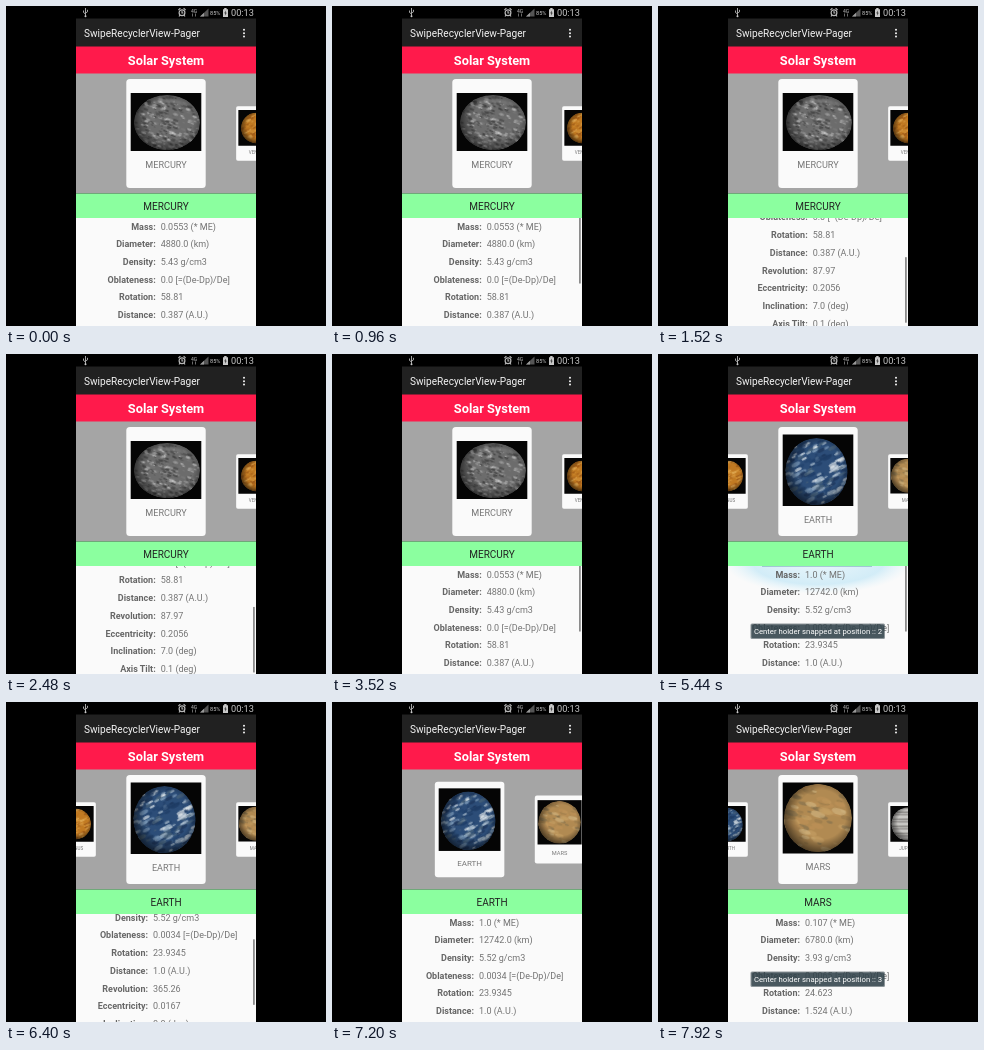
Write an HTML page that moves like this. It is 320 px wide and 320 px high and loops after 8 s.

```html
<!DOCTYPE html>
<html lang="en">
<head>
<meta charset="utf-8">
<title>Solar System pager</title>
<style>
html, body { margin: 0; width: 100%; height: 100%; overflow: hidden; background: #000; }
svg { display: block; width: 100vw; height: 100vh; font-family: Roboto, "Open Sans", sans-serif; }
</style>
</head>
<body>
<svg id="stage" viewBox="0 0 320 320">
  <defs>
    <clipPath id="pagerClip"><rect x="70" y="67" width="180" height="120"/></clipPath>
    <clipPath id="listClip"><rect x="70" y="212" width="180" height="108"/></clipPath>
    <radialGradient id="glowFill">
      <stop offset="0" stop-color="#d5f0fb" stop-opacity=".5"/>
      <stop offset=".7" stop-color="#bde5f6" stop-opacity=".65"/>
      <stop offset="1" stop-color="#d8f2fc" stop-opacity="0"/>
    </radialGradient>
    <radialGradient id="shade" cx=".55" cy=".45" r=".6">
      <stop offset=".6" stop-color="#000" stop-opacity="0"/>
      <stop offset="1" stop-color="#000" stop-opacity=".65"/>
    </radialGradient>
    <filter id="soft" x="-20%" y="-20%" width="140%" height="140%"><feGaussianBlur stdDeviation=".45"/></filter>
  </defs>

  <rect width="320" height="320" fill="#000"/>
  <rect x="70" y="12.5" width="180" height="28.5" fill="#212121"/>
  <rect x="70" y="40.5" width="180" height="27.5" fill="#ff1a4b"/>
  <rect x="70" y="67.5" width="180" height="120" fill="#a5a5a5"/>
  <rect x="70" y="212" width="180" height="108" fill="#fafafa"/>

  <g fill="none" stroke="#b8b8b8" stroke-width=".9">
    <path d="M79.5 2v8.5M79.5 8l-2-1.5v-2M79.5 7l2-1.2v-2"/>
    <circle cx="176" cy="6.7" r="2.9" stroke-width="1.2"/>
    <path d="M176 5v2h1.4M172.4 4l2-1.8M179.6 4l-2-1.8M174 9l-1 1.5M178 9l1 1.5" stroke-width="1.1"/>
    <path d="M186.5 7.5v3M189.5 7.5v3" stroke="#777"/>
  </g>
  <g fill="#c8c8c8">
    <path d="M194 10.5h8.5V2.5z" fill="#555"/>
    <path d="M194 10.5h4V6.7z" fill="#999"/>
    <path d="M217 3.2h1.2v-1.2h2.4v1.2h1.4v7.8h-5z"/>
    <path d="M219.8 4.5l-1.5 2.8h1.1l-.5 2.4 1.8-3h-1.1z" fill="#222"/>
    <circle cx="79.5" cy="10.2" r="1"/>
    <text x="185" y="6.5" font-size="5">4G</text>
    <text x="204" y="8.9" font-size="5.6">85%</text>
    <text x="225" y="9.8" font-size="9.2">00:13</text>
  </g>
  <text x="78" y="30.7" font-size="10.1" fill="#f4f4f4">SwipeRecyclerView-Pager</text>
  <g fill="#f4f4f4">
    <circle cx="238" cy="23.8" r="1"/><circle cx="238" cy="27.2" r="1"/><circle cx="238" cy="30.6" r="1"/>
  </g>
  <text x="160" y="59" font-size="12.8" font-weight="700" fill="#fff" text-anchor="middle">Solar System</text>

  <g clip-path="url(#pagerClip)"><g id="cards"></g></g>

  <g clip-path="url(#listClip)">
    <g id="glow">
      <ellipse cx="160" cy="208" rx="94" ry="32" fill="url(#glowFill)"/>
      <rect x="104" y="212" width="110" height="1" fill="#6d9db3" opacity=".5"/>
    </g>
    <g id="lists"></g>
    <rect id="bar" x="247" width="1.8" height="65.5" fill="#8c8c8c"/>
  </g>

  <rect x="70" y="187.5" width="180" height="24.5" fill="#8bff9f"/>
  <text id="heading" x="160" y="203.6" font-size="10" fill="#222" text-anchor="middle"></text>

  <g id="toast">
    <rect x="92.5" y="269.5" width="134.5" height="15.5" rx="1.5" fill="#33444c" opacity=".55"/>
    <rect x="93.5" y="270.5" width="132.5" height="13.5" rx="1" fill="#33444c" opacity=".75"/>
    <text id="toastText" x="160" y="279.9" font-size="7.75" fill="#fff" text-anchor="middle"></text>
  </g>
</svg>

<script>
const LOOP = 8000, STEP = 90, ROW = 17.7, MAX_SCROLL = 65;
const NS = "http://www.w3.org/2000/svg";
const $ = id => document.getElementById(id);

function add(parent, tag, attrs, text) {
  const el = document.createElementNS(NS, tag);
  for (const k in attrs) el.setAttribute(k, attrs[k]);
  if (text !== undefined) el.textContent = text;
  parent.appendChild(el);
  return el;
}

function seeded(seed) {
  return () => {
    seed = (seed * 16807) % 2147483647;
    return seed / 2147483647;
  };
}

const FIELDS = ["Mass", "Diameter", "Density", "Oblateness", "Rotation",
  "Distance", "Revolution", "Eccentricity", "Inclination", "Axis Tilt"];

const planets = [
  { name: "MERCURY", top: -40.5, h: 58, cx: 1, cy: -11, rx: 33, ry: 27.5, base: "#6c6c6c",
    spots: ["#a0a0a0", "#454545", "#d0d0d0", "#787878", "#383838"], count: 330, size: 1.3, tilt: 20, column: 149.7,
    data: ["0.0553 (* ME)", "4880.0 (km)", "5.43 g/cm3", "0.0 [=(De-Dp)/De]", "58.81",
      "0.387 (A.U.)", "87.97", "0.2056", "7.0 (deg)", "0.1 (deg)"] },
  { name: "VENUS", top: -47, h: 71.5, cx: 0, cy: -11, rx: 30, ry: 30.5, base: "#c17a22",
    spots: ["#dda044", "#a45d17", "#e8b660", "#914d12"], count: 80, size: 2.5, tilt: -25 },
  { name: "EARTH", top: -47, h: 71.5, cx: -1.5, cy: -10, rx: 31, ry: 33.5, base: "#2c4d78",
    spots: ["#e6ecef", "#1b3357", "#7f9dba", "#20406b", "#b4c5d3", "#1d3a62", "#4d6579"],
    count: 190, size: 2.2, tilt: -28, column: 142,
    data: ["1.0 (* ME)", "12742.0 (km)", "5.52 g/cm3", "0.0034 [=(De-Dp)/De]", "23.9345",
      "1.0 (A.U.)", "365.26", "0.0167", "0.0 (deg)", "23.45 (deg)"] },
  { name: "MARS", top: -47, h: 71, cx: 0, cy: -11.5, rx: 34, ry: 34, base: "#b18a52",
    spots: ["#c59e62", "#98794a", "#bd9056", "#82704d", "#d0b47f"], count: 70, size: 3.4, tilt: 15, column: 142,
    data: ["0.107 (* ME)", "6780.0 (km)", "3.93 g/cm3", "0.0065 [=(De-Dp)/De]", "24.623",
      "1.524 (A.U.)", "686.98", "0.0934", "1.85 (deg)", "25.19 (deg)"] },
  { name: "JUPITER", top: -47, h: 71.5, cx: 0, cy: -11, rx: 33, ry: 33, base: "#b9b8b5",
    spots: ["#8f8d8a", "#d9d8d4", "#7d7b79"], count: 14, size: 3, tilt: 0, bands: true }
];

function buildCard(p, i) {
  const card = add($("cards"), "g", {});
  const { cx, cy, rx, ry } = p, rnd = seeded(91 + i * 577);
  add(card, "rect", { x: -39.7, y: -54.5, width: 79.4, height: 109, rx: 3.5, fill: "#fafafa" });
  add(card, "rect", { x: -35.3, y: p.top, width: 70.6, height: p.h, fill: "#050505" });
  const disc = { cx, cy, rx, ry };
  add(add(card, "clipPath", { id: "disc" + i }), "ellipse", disc);
  const globe = add(card, "g", { "clip-path": `url(#disc${i})` });
  add(globe, "ellipse", { ...disc, fill: p.base });
  const marks = add(globe, "g", { filter: "url(#soft)", transform: `rotate(${p.tilt} ${cx} ${cy})` });
  for (let n = 0; n < p.count; n++) {
    const a = rnd() * Math.PI * 2, r = Math.sqrt(rnd());
    const s = p.size * (0.4 + rnd());
    add(marks, "ellipse", {
      cx: p.bands ? cx : cx + Math.cos(a) * r * rx,
      cy: cy + (p.bands ? (n / p.count * 2 - 1) * ry : Math.sin(a) * r * ry),
      rx: p.bands ? 40 : s * 1.6, ry: p.bands ? 1.6 : s * 0.7,
      fill: p.spots[n % p.spots.length], opacity: 0.65
    });
  }
  add(globe, "ellipse", { ...disc, fill: "url(#shade)" });
  add(card, "text", { x: 0, y: p.top + p.h + 16.7, "font-size": 9.1, fill: "#777", "text-anchor": "middle" }, p.name);
  return card;
}

function buildList(p) {
  if (!p.data) return null;
  const list = add($("lists"), "g", { "font-size": 9, fill: "#737373" });
  FIELDS.forEach((field, n) => {
    const y = 223.6 + n * ROW;
    add(list, "text", { x: p.column, y, "font-weight": 700, fill: "#666", "text-anchor": "end" }, field + ":");
    add(list, "text", { x: p.column + 5, y }, p.data[n]);
  });
  return list;
}

const cards = planets.map(buildCard);
const lists = planets.map(buildList);

const ramp = (t, a, b) => Math.min(1, Math.max(0, (t - a) / (b - a)));
const ease = u => u < 0.5 ? 4 * u ** 3 : 1 - 4 * (1 - u) ** 3;
const move = (t, a, b) => ease(ramp(t, a, b));
// Rises over a..b, falls over c..d
const pulse = (t, a, b, c, d) => ramp(t, a, b) - ramp(t, c, d);

function draw(t) {
  const page = 2 * move(t, 3600, 4590) + move(t, 6880, 7690);
  cards.forEach((card, i) => {
    const d = (i - page) * STEP;
    const scale = 1 - 0.5 * Math.min(1, Math.abs(d) / STEP);
    card.setAttribute("transform", `translate(${160 + d} 127.5) scale(${scale})`);
  });

  const current = t < 4560 ? 0 : t < 7660 ? 2 : 3;
  const scroll = MAX_SCROLL * (move(t, 960, 1680) - move(t, 2600, 3400)
    + move(t, 5500, 6080) - move(t, 6120, 6735));
  lists.forEach((list, i) => {
    if (!list) return;
    list.setAttribute("display", i === current ? "inline" : "none");
    list.setAttribute("transform", `translate(0 ${-scroll})`);
  });
  $("heading").textContent = planets[current].name;

  $("bar").setAttribute("y", 212 + scroll * 0.63);
  $("bar").setAttribute("opacity", pulse(t, 940, 960, 3580, 3840) + pulse(t, 5100, 5120, 6850, 7100));
  $("glow").setAttribute("opacity", pulse(t, 5120, 5360, 5460, 5760));

  $("toast").setAttribute("opacity", pulse(t, 4620, 4940, 6040, 6300) + ramp(t, 7700, 7900));
  $("toastText").textContent = "Center holder snapped at position :: " + (current || 2);
}

function tick() {
  draw(performance.now() % LOOP);
  requestAnimationFrame(tick);
}
tick();
</script>
</body>
</html>
```
